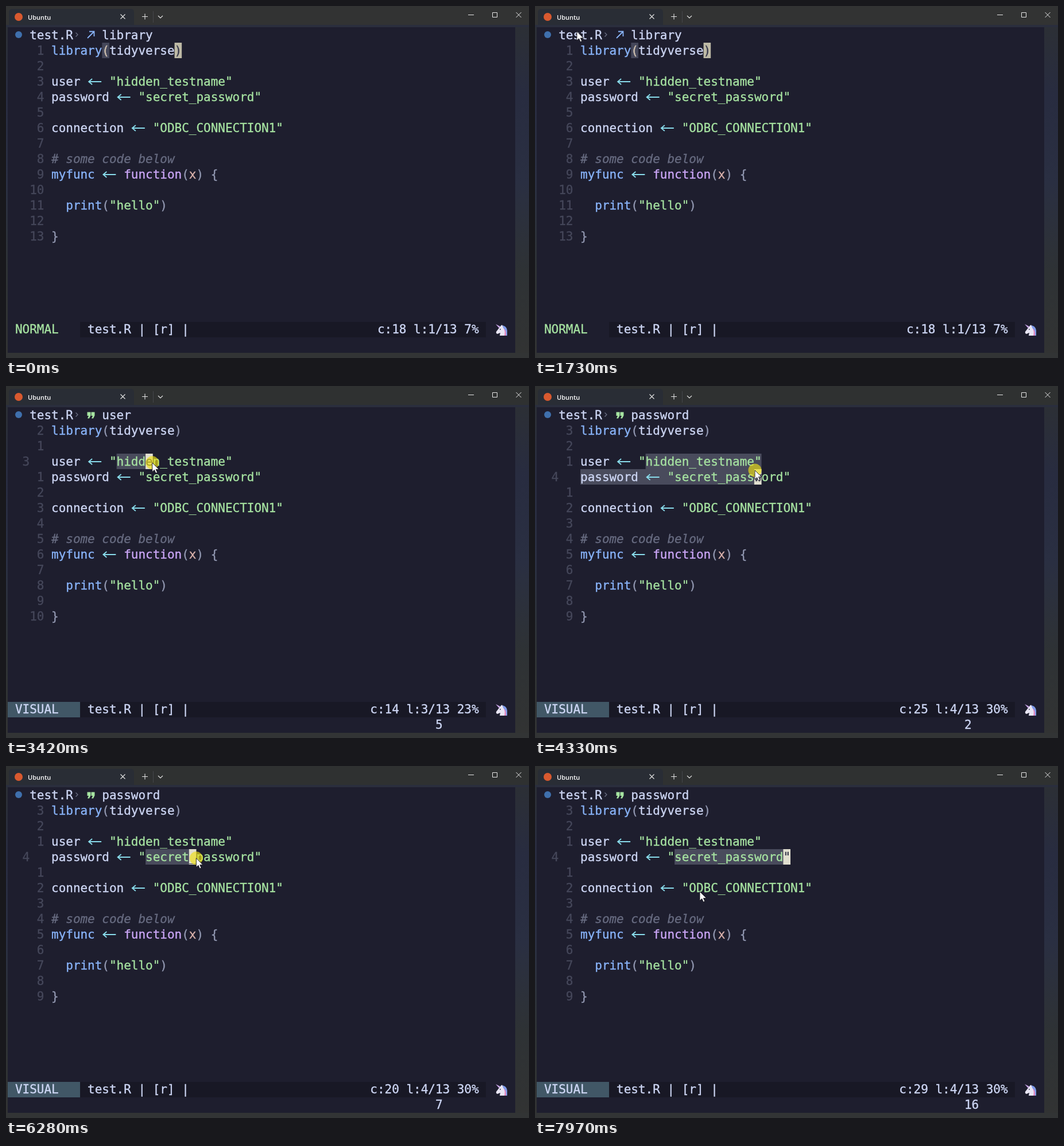
An HTML page with a canvas for the animation above (7990 ms loop, 911x614 px).

```html
<!DOCTYPE html>
<html lang="en">
<head>
<meta charset="utf-8">
<title>Editor selection</title>
<style>
html, body { margin: 0; width: 100%; height: 100%; overflow: hidden; background: #1e1e2e; }
canvas { display: block; }
</style>
</head>
<body>
<canvas id="stage" width="911" height="614"></canvas>
<script>
const ctx = document.getElementById('stage').getContext('2d');
const LOOP = 7990, CW = 12.62, LH = 27, X0 = 3.3, Y0 = 37, CODE = 6;
const FONT = '21px "DejaVu Sans Mono", "Noto Sans Mono", monospace';
const C = {
  bg: '#1e1e2e', text: '#cdd6f4', green: '#a6e3a1', blue: '#89b4fa', sky: '#89dceb',
  mauve: '#cba6f7', param: '#dab2ac', paren: '#9399b2', comment: '#676b80',
  num: '#45475a', select: '#494b5c'
};

const assign = (name, color, value) => [[name, color], [' '], ['<-', C.sky], [' '], [value, C.green]];
const code = [
  [['library', C.blue], ['(', C.paren], ['tidyverse'], [')', C.paren]],
  [],
  assign('user', C.text, '"hidden_testname"'),
  assign('password', C.text, '"secret_password"'),
  [],
  assign('connection', C.text, '"ODBC_CONNECTION1"'),
  [],
  [['# some code below', C.comment, 'italic ']],
  [...assign('myfunc', C.blue, ''), ['function', C.mauve], ['(', C.paren], ['x', C.param], [') {', C.paren]],
  [],
  [['  '], ['print', C.blue], ['(', C.paren], ['"hello"', C.green], [')', C.paren]],
  [],
  [['}', C.paren]]
];
const plain = row => code[row - 1].map(part => part[0]).join('');

// The pointer enters here, glides steadily to each goal and rests in between.
const entry = { x: 864, y: 614 };
const moves = [
  { from: 230, to: 1010, x: 84, y: 60 },
  { from: 1010, to: 1220, x: 34, y: 51 },
  { from: 1220, to: 1520, x: 134, y: 48 },
  { from: 1520, to: 1810, x: 50, y: 43 },
  { from: 1840, to: 2620, x: 193, y: 126 },
  { from: 3090, to: 4060, x: 374, y: 149 },
  { from: 4290, to: 4300, x: 383, y: 147 },
  { from: 4610, to: 4700, x: 382, y: 131 },
  { from: 5010, to: 5800, x: 246, y: 165 },
  { from: 5920, to: 6690, x: 428, y: 156 },
  { from: 6720, to: 6800, x: 444, y: 155 },
  { from: 7190, to: 7560, x: 375, y: 290 },
  { from: 7560, to: 7970, x: 287, y: 219 }
];
const drags = [{ from: 3090, to: 4710 }, { from: 5920, to: 6805 }];

function pointer(t) {
  let { x, y } = entry;
  for (const m of moves) {
    const f = Math.min(1, Math.max(0, (t - m.from) / (m.to - m.from)));
    x += (m.x - x) * f;
    y += (m.y - y) * f;
  }
  return { x, y };
}

const cellX = col => X0 + col * CW;
const rowY = row => Y0 + row * LH;

function cellAt({ x, y }) {
  const row = Math.floor((y - Y0) / LH);
  const col = Math.floor((x - cellX(CODE)) / CW);
  return { row, col: Math.min(col, plain(row).length - 1) };
}

// The editor follows the pointer with a short lag.
function editorState(t) {
  const drag = drags.filter(d => d.from <= t).pop();
  if (!drag) return { row: 1, col: 17 };
  const start = cellAt(pointer(drag.from));
  const end = cellAt(pointer(Math.max(drag.from, Math.min(t - 25, drag.to))));
  const visual = end.row !== start.row || end.col !== start.col;
  return { ...end, start, active: true, visual };
}

function rect(x, y, w, h, color) {
  ctx.fillStyle = color;
  ctx.fillRect(x, y, w, h);
}

function cells(col, row, n, color) {
  rect(cellX(col), rowY(row), n * CW, LH, color);
}

function disc(x, y, r, color) {
  ctx.fillStyle = color;
  ctx.beginPath();
  ctx.arc(x, y, r, 0, 7);
  ctx.fill();
}

function stroke(d, color, width = 1) {
  ctx.strokeStyle = color;
  ctx.lineWidth = width;
  ctx.stroke(new Path2D(d));
}

function shape(d, color) {
  ctx.fillStyle = color;
  ctx.fill(new Path2D(d));
}

function write(s, col, row, color = C.text, style = '') {
  ctx.font = style + FONT;
  ctx.fillStyle = ctx.strokeStyle = color;
  ctx.lineWidth = 0.35;
  [...s].forEach((ch, i) => {
    const x = cellX(col + i), y = rowY(row) + 21;
    ctx.fillText(ch, x, y);
    ctx.strokeText(ch, x, y);
  });
}

function drawWindow(focused) {
  const side = ctx.createLinearGradient(0, 0, 0, 614);
  ['#2d3032', '#282c40', '#2a2f42', '#2e3235', '#323333'].forEach((c, i) => side.addColorStop(i / 4, c));
  rect(0, 0, 911, 614, side);
  rect(0, 0, 911, 33, focused ? '#2f3131' : '#323333');
  rect(0, 33, 911, 4, '#2a2e3d');
  rect(0, 605, 911, 9, '#323435');
  rect(3, 37, 884, 568, C.bg);

  shape('M5 33V11Q5 5 11 5H217Q223 5 223 11V33Z', '#292d35');
  disc(22, 19, 7, '#d9592f');
  ctx.font = '600 11px "Open Sans", "Noto Sans", sans-serif';
  ctx.fillStyle = '#fff';
  ctx.fillText('Ubuntu', 38, 23.5);
  stroke('M199.5 14.5l8 8m0-8l-8 8M237 18.5h10m-5-5v10M265 17l4 4 4-4', '#e4e4e4', 1.1);
  stroke('M256.5 9v20', '#45474b');
  stroke('M805 15.5h10M847.5 11.5h8v8h-8zM888.5 11l9 9m0-9l-9 9', '#e8e8e8');
}

function drawHeader(row) {
  disc(22, 50, 6, '#3f70ad');
  write('test.R', 3, 0);
  stroke('M121.5 46.5l3.5 3.5-3.5 3.5', '#6c7086', 1.3);
  if (row === 1) stroke('M142 56L153.5 44.5M145 44.5h8.5v8.5', C.blue, 1.8);
  else for (const x of [141.5, 148.5]) shape(`M${x} 45.5h6v6l-2.5 5h-3l2-4.5h-2.5z`, C.green);
  write(row === 1 ? 'library' : code[row - 1][0][0], 13, 0);
}

function drawSelection(s) {
  if (s.row === 1) cells(CODE + 7, 1, 1, C.num);
  if (!s.visual) return;
  for (let row = s.start.row; row <= s.row; row++) {
    const first = row === s.start.row ? s.start.col : 0;
    const last = row === s.row ? s.col : plain(row).length - 1;
    cells(CODE + first, row, last - first + 1, C.select);
  }
}

function drawCode(s) {
  code.forEach((parts, i) => {
    const row = i + 1, current = s.active && row === s.row;
    const label = String(s.active && !current ? Math.abs(row - s.row) : row);
    write(label, current ? 2 : 5 - label.length, row, C.num);
    let col = CODE;
    for (const [str, color, style] of parts) {
      if (str === '<-') {
        const x = cellX(col) + 2, y = rowY(row) + 14;
        stroke(`M${x + 22} ${y}H${x}m6 -5l-6 5 6 5`, color, 1.8);
      } else write(str, col, row, color, style);
      col += str.length;
    }
  });
  if (s.row === 1) write('(', CODE + 7, 1, '#c9b9a6');
  cells(CODE + s.col, s.row, 1, s.active ? '#e0decf' : '#bdb9a5');
  write(plain(s.row)[s.col], CODE + s.col, s.row, '#35364a');
}

function drawUnicorn() {
  shape('M862 557q10 0 11 9v9h-7l-5-9z', '#7f9bea');
  shape('M866 562q6 3 5 13h-5z', '#e58bc0');
  shape('M861 559l3-3 2 5q4 6 2 14h-8l1-5-5 2q-3-1-2-4z', '#e9e6f5');
  shape('M853 555l8 4-2 3z', '#c9a4e6');
  disc(861, 564, 0.9, '#33334d');
}

function drawStatus(s) {
  rect(129, 551, 707, 27, '#181825');
  if (s.visual) rect(3, 551, 126, 27, '#415766');
  write(s.visual ? 'VISUAL' : 'NORMAL', 1, 19, s.visual ? C.text : C.green);
  write('test.R | [r] |', 11, 19);
  const info = `c:${s.col + 1} l:${s.row}/13 ${Math.floor(s.row / 13 * 100)}%`;
  write(info, 65 - info.length, 19);
  drawUnicorn();
  if (s.visual) {
    const lines = s.row - s.start.row + 1;
    write(String(lines > 1 ? lines : s.col - s.start.col + 1), 59, 20);
  }
}

function drawPointer(t) {
  if (t < moves[0].from) return;
  const { x, y } = pointer(t);
  if (drags.some(d => t >= d.from && t < d.to)) disc(x, y, 11.5, 'rgba(240,225,20,.65)');
  const arrow = `M${x} ${y}v16l3.7-3.5 2.5 5.7 2.6-1.2-2.4-5.4h5.2z`;
  shape(arrow, '#fff');
  stroke(arrow, '#15151c', 0.9);
}

function frame(now) {
  const t = now % LOOP, s = editorState(t);
  drawWindow(s.active);
  drawHeader(s.row);
  drawSelection(s);
  drawCode(s);
  drawStatus(s);
  drawPointer(t);
  requestAnimationFrame(frame);
}
requestAnimationFrame(frame);
</script>
</body>
</html>
```
